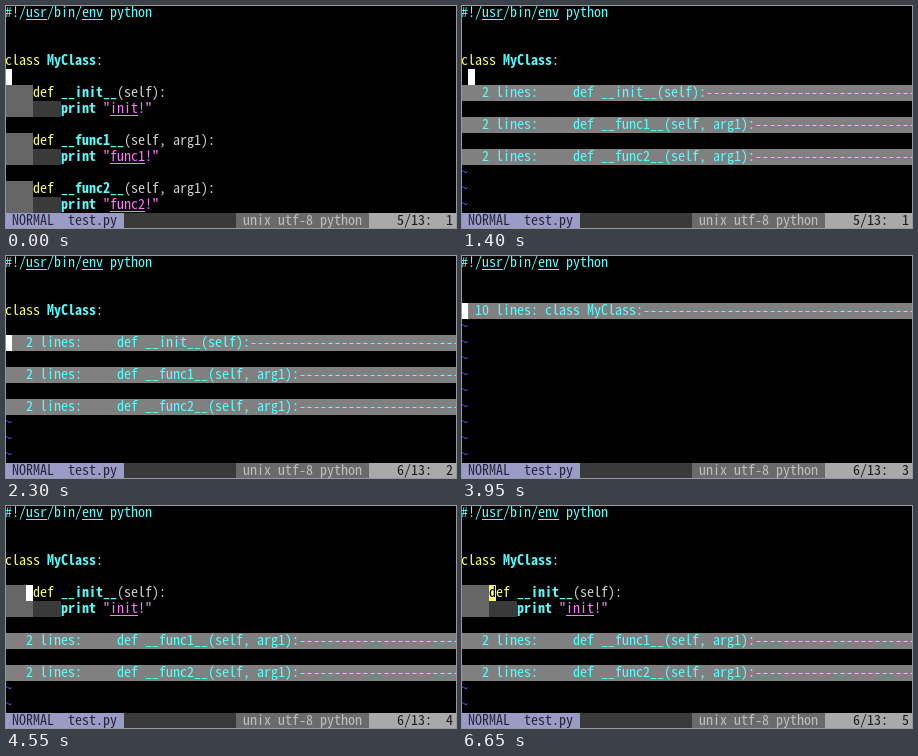
An HTML page with a canvas for the animation above (8 s loop, 450 px wide and 222 px high).

```html
<!DOCTYPE html>
<html lang="en">
<head>
<meta charset="utf-8">
<title>Code folding</title>
<style>
html, body { margin: 0; width: 100%; height: 100%; overflow: hidden; background: #000; }
canvas { display: block; }
</style>
</head>
<body>
<canvas id="screen" width="450" height="222"></canvas>
<script>
const ctx = document.getElementById('screen').getContext('2d');
const CELL = 7, ROW = 16, LOOP = 8000, LAST_ROW = 12;
const FAMILY = '"Noto Sans Mono CJK JP", "Noto Sans Mono", monospace';
const CYAN = '#55ffff', YELLOW = '#ffff5c', PINK = '#ff76ff', PLAIN = '#cfcfcf',
      BLUE = '#5c5cff', FOLD = '#808080', GUIDE = '#666666', GUIDE2 = '#3a3a3a';

// Choose the size whose advance is exactly one cell.
ctx.font = '100px ' + FAMILY;
const fontSize = CELL * 100 / ctx.measureText('0').width;

const cellX = col => col * CELL - 1;
const rowY = row => row * ROW - 1;

function block(row, col, count, color) {
  ctx.fillStyle = color;
  ctx.fillRect(cellX(col), rowY(row), count * CELL, ROW);
}

function put(row, col, text, color, bold) {
  ctx.font = (bold ? 'bold ' : '') + fontSize + 'px ' + FAMILY;
  ctx.fillStyle = color;
  ctx.fillText(text, cellX(col), rowY(row) + 12);
}

function underline(row, col, count, color) {
  ctx.fillStyle = color;
  ctx.fillRect(cellX(col), rowY(row) + 14, count * CELL, 1);
}

const methods = [
  { name: '__init__', args: '(self):', word: 'init' },
  { name: '__func1__', args: '(self, arg1):', word: 'func1' },
  { name: '__func2__', args: '(self, arg1):', word: 'func2' }
];

function foldLine(row, count, text) {
  block(row, 0, 65, FOLD);
  put(row, 0, (String(count).padStart(4) + ' lines: ' + text).padEnd(65, '-'), CYAN);
}

function methodLines(row, m) {
  block(row, 0, 4, GUIDE);
  put(row, 4, 'def', YELLOW);
  put(row, 8, m.name, CYAN, true);
  put(row, 8 + m.name.length, m.args, PLAIN);
  block(row + 1, 0, 4, GUIDE);
  block(row + 1, 4, 4, GUIDE2);
  put(row + 1, 8, 'print', CYAN, true);
  put(row + 1, 14, '"' + m.word + '!"', PINK);
  underline(row + 1, 15, m.word.length, PINK);
}

function header() {
  put(0, 0, '#!/usr/bin/env python', CYAN);
  underline(0, 3, 3, CYAN);
  underline(0, 11, 3, CYAN);
}

// Draws the class with its first `open` methods unfolded; returns the next free row.
function classBody(open) {
  put(3, 0, 'class', YELLOW);
  put(3, 6, 'MyClass', CYAN, true);
  put(3, 13, ':', PLAIN);
  let row = 5;
  methods.forEach((m, i) => {
    if (i < open) {
      methodLines(row, m);
      row += 3;
    } else {
      foldLine(row, 2, '    def ' + m.name + m.args);
      row += 2;
    }
  });
  return row - 1;
}

function statusBar(line, col) {
  block(13, 0, 17, '#9b9bc8');
  block(13, 17, 16, '#3a3a3a');
  block(13, 33, 19, '#6a6a6a');
  block(13, 52, 13, '#a9a9a9');
  put(13, 1, 'NORMAL', '#26263a');
  put(13, 9, 'test.py', '#26263a');
  put(13, 34, 'unix utf-8 python', '#bdbdbd');
  put(13, 56, line + '/13:' + String(col).padStart(3), '#1c1c1c');
}

// open: number of unfolded methods, or -1 when the whole class is folded
const steps = [
  { at: 0,    open: 3,  cursor: [4, 0], line: 5, col: 1 },
  { at: 500,  open: -1, cursor: [3, 0], line: 5, col: 1 },
  { at: 1400, open: 0,  cursor: [4, 1], line: 5, col: 1 },
  { at: 2300, open: 0,  cursor: [5, 0], line: 6, col: 2 },
  { at: 2600, open: 1,  cursor: [5, 2], line: 6, col: 3 },
  { at: 3950, open: -1, cursor: [3, 0], line: 6, col: 3 },
  { at: 4550, open: 1,  cursor: [5, 3], line: 6, col: 4 },
  { at: 5750, open: 0,  cursor: [5, 0], line: 6, col: 4 },
  { at: 6650, open: 1,  cursor: [5, 4], line: 6, col: 5, under: 'd' }
];

function draw(step) {
  ctx.fillStyle = '#000';
  ctx.fillRect(0, 0, 450, 222);
  header();
  let row = 4;
  if (step.open < 0) foldLine(3, 10, 'class MyClass:');
  else row = classBody(step.open);
  for (; row <= LAST_ROW; row++) put(row, 0, '~', BLUE);

  const [r, c] = step.cursor;
  block(r, c, 1, step.under ? YELLOW : '#fff');
  if (step.under) put(r, c, step.under, '#000');
  statusBar(step.line, step.col);
}

const start = performance.now();
function tick() {
  const t = Math.max(0, performance.now() - start) % LOOP;
  draw(steps.filter(s => s.at <= t).pop());
  requestAnimationFrame(tick);
}
tick();
</script>
</body>
</html>
```
